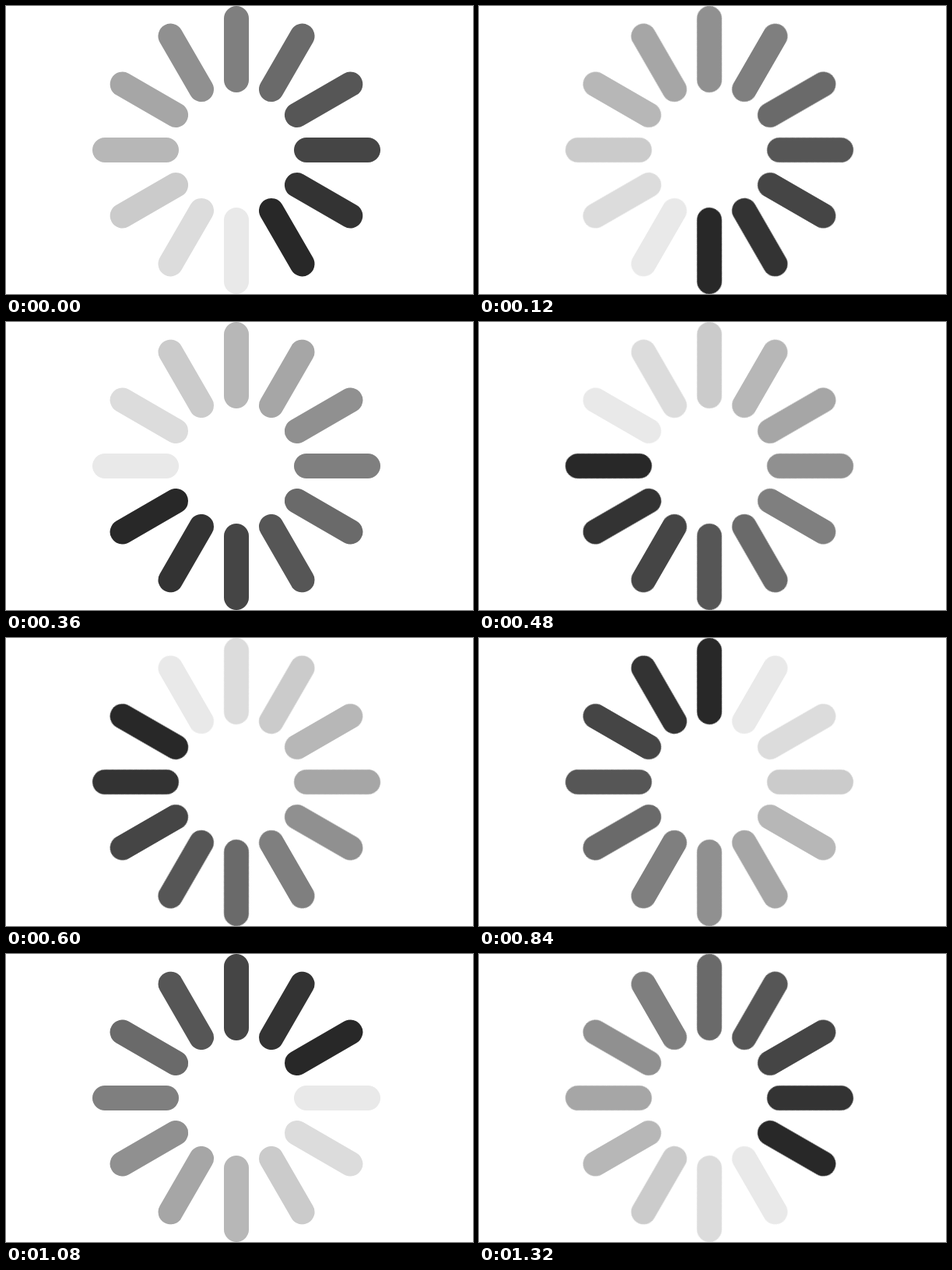
Write an HTML page without scripts that moves like this. It is 600 px wide and 370 px high and loops after 1.44 s.

```html
<!DOCTYPE html>
<html lang="en">
<head>
<meta charset="utf-8">
<title>Loading spinner</title>
<style>
  html, body {
    margin: 0;
    width: 100%;
    height: 100%;
    overflow: hidden;
    background: #fff;
  }
  svg {
    display: block;
    width: 600px;
    height: 370px;
  }
  .spinner {
    stroke-width: 32;
    stroke-linecap: round;
    transform-origin: 0 0;
    animation: spin 1440ms steps(12, end) infinite;
  }
  @keyframes spin {
    from { transform: rotate(0deg); }
    to { transform: rotate(360deg); }
  }
</style>
</head>
<body>
<svg viewBox="0 0 600 370" role="img" aria-label="Loading">
  <defs>
    <path id="bar" d="M0-90V-169"/>
  </defs>
  <g transform="translate(296 185)">
    <!-- Darkest bar leads; the tail fades counter-clockwise -->
    <g class="spinner">
      <use href="#bar" stroke="#282828" transform="rotate(150)"/>
      <use href="#bar" stroke="#333" transform="rotate(120)"/>
      <use href="#bar" stroke="#454545" transform="rotate(90)"/>
      <use href="#bar" stroke="#565656" transform="rotate(60)"/>
      <use href="#bar" stroke="#6a6a6a" transform="rotate(30)"/>
      <use href="#bar" stroke="#7f7f7f"/>
      <use href="#bar" stroke="#909090" transform="rotate(-30)"/>
      <use href="#bar" stroke="#a6a6a6" transform="rotate(-60)"/>
      <use href="#bar" stroke="#b7b7b7" transform="rotate(-90)"/>
      <use href="#bar" stroke="#cbcbcb" transform="rotate(-120)"/>
      <use href="#bar" stroke="#dcdcdc" transform="rotate(-150)"/>
      <use href="#bar" stroke="#e9e9e9" transform="rotate(180)"/>
    </g>
  </g>
</svg>
</body>
</html>
```
